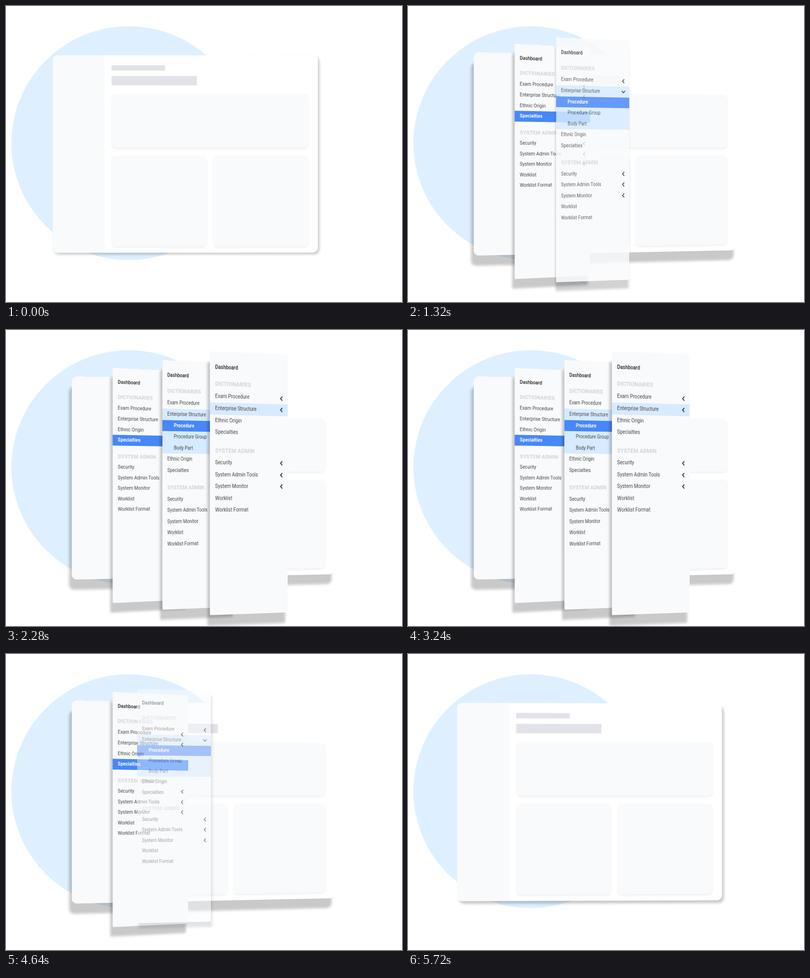
These frames come from a looping animation (800x600 px, 5.76 s). An HTML page:

```html
<!DOCTYPE html>
<html lang="en">
<head>
<meta charset="utf-8">
<title>Layered menus</title>
<style>
  html, body { margin: 0; width: 100%; height: 100%; overflow: hidden; background: #fff; }
  #stage { position: relative; width: 800px; height: 600px; overflow: hidden; font: 10.3px Roboto, sans-serif; color: #444; }
  #stage div, #stage svg { position: absolute; }
  .disc { left: 11px; top: 41px; width: 474px; height: 474px; border-radius: 50%; background: #def0ff; }
  .layer { left: 0; top: 0; transform-origin: 0 0; }
  .card { width: 536px; height: 400px; border-radius: 10px; background: #fff; }
  .side { width: 105px; height: 400px; border-radius: 10px 0 0 10px; background: #f9fafc; }
  .bar { left: 119px; background: #e2e3e9; }
  .panel { border-radius: 9px; background: #f9fafc; box-shadow: 0 3px 4px rgba(0, 0, 0, .06); }
  .menu { width: 172px; height: 500px; border-radius: 2px; background: #f9fafc; opacity: 0; }
  .row { left: 0; width: 172px; height: 22.6px; line-height: 22.6px; text-indent: 11.3px; white-space: nowrap; }
  .top { font-weight: 500; color: #222; }
  .head { font-size: 11.8px; font-weight: 700; color: #d2d4d8; }
  .open { background: #d6ebff; }
  .sub { text-indent: 26.5px; }
  .on { background: #4787f8; color: #fff; font-weight: 700; }
  .row svg { left: 153px; top: 6.3px; width: 10px; height: 10px; fill: none; stroke: #111; stroke-width: 1.7; }
  .down svg { transform: rotate(-90deg); }
</style>
</head>
<body>
<div id="stage">
  <div class="disc"></div>
  <div class="layer card">
    <div class="side"></div>
    <div class="bar" style="top:20px;width:108px;height:10.5px"></div>
    <div class="bar" style="top:42px;width:172px;height:19px"></div>
    <div class="panel" style="left:119px;top:78px;width:398px;height:109px"></div>
    <div class="panel" style="left:119px;top:203px;width:192px;height:184px"></div>
    <div class="panel" style="left:324px;top:203px;width:193px;height:184px"></div>
  </div>
</div>
<script>
const LOOP = 5760, PHASE = 40, MOVE = 500, ROW = 22.55;
const stage = document.getElementById('stage');
const arrow = '<svg viewBox="0 0 10 10"><path d="M7 1L3 5L7 9"/></svg>';

function addRow(menu, y, text, cls = '') {
  const row = document.createElement('div');
  row.className = 'row ' + cls;
  row.style.top = y - 11.3 + 'px';
  row.innerHTML = text + (/more|down/.test(cls) ? arrow : '');
  menu.append(row);
}

function addMenu(styles, subs = []) {
  const menu = document.createElement('div');
  menu.className = 'layer menu';
  const list = (y, items) => items.forEach(([text, cls = ''], i) =>
    addRow(menu, y + i * ROW, text, cls + ' ' + (styles[text] || '')));
  const shift = subs.length * ROW;
  addRow(menu, 30.4, 'Dashboard', 'top');
  addRow(menu, 61.7, 'DICTIONARIES', 'head');
  list(85.7, [['Exam Procedure', 'more'], ['Enterprise Structure', 'more'],
    ...subs.map(s => [s, 'sub open']), ['Ethnic Origin'], ['Specialties']]);
  addRow(menu, 187.8 + shift, 'SYSTEM ADMIN', 'head');
  list(211.3 + shift, [['Security', 'more'], ['System Admin Tools', 'more'],
    ['System Monitor', 'more'], ['Worklist'], ['Worklist Format']]);
  stage.append(menu);
  return menu;
}

// Poses: left x, right x, left top, left bottom, right top, right bottom
const layers = [
  { el: stage.querySelector('.card'), w: 536, h: 400, start: 10, solid: true,
    from: [92.5, 628.7, 100, 500, 100, 500], to: [133, 663, 94, 506, 104.5, 495] },
  { el: addMenu({ Specialties: 'on' }), start: 490,
    from: [133.3, 281.3, 95.5, 527, 99.5, 523], to: [215.5, 368, 77, 553.5, 84, 546.5] },
  { el: addMenu({ 'Enterprise Structure': 'open down', Procedure: 'on' },
      ['Procedure', 'Procedure Group', 'Body Part']), start: 1015,
    from: [216, 367, 80, 525, 80.5, 524.5], to: [316, 463, 61, 567, 67, 561] },
  { el: addMenu({ 'Enterprise Structure': 'open' }), start: 1500,
    from: [316, 474, 70, 554, 73, 552], to: [412, 569, 43, 578, 49.5, 572.5] }
];

// cubic-bezier(.25, .1, .25, 1)
function ease(x) {
  if (x <= 0) return 0;
  if (x >= 1) return 1;
  const curve = (a, b, s) => 3 * a * s * (1 - s) ** 2 + 3 * b * s * s * (1 - s) + s ** 3;
  let lo = 0, hi = 1;
  for (let i = 0; i < 24; i++) {
    const mid = (lo + hi) / 2;
    if (curve(.25, .25, mid) < x) lo = mid; else hi = mid;
  }
  return curve(.1, 1, lo);
}

// Perspective matrix for a box whose sides stay vertical
function project([xl, xr, tl, bl, tr, br], w, h) {
  const k = (bl - tl) / (br - tr);
  return `matrix3d(${[(xr * k - xl) / w, (tr * k - tl) / w, 0, (k - 1) / w,
    0, (bl - tl) / h, 0, 0, 0, 0, 1, 0, xl, tl, 0, 1].map(v => v.toFixed(8))})`;
}

function pose({ el, w = 172, h = 500, start, from, to, solid }, time) {
  const p = ease((time - start) / MOVE);
  const angle = (135 + 60 * p) * Math.PI / 180, dist = 4 + 17 * p;
  const dx = Math.sin(angle) * dist, dy = -Math.cos(angle) * dist;
  el.style.transform = project(from.map((v, i) => v + (to[i] - v) * p), w, h);
  el.style.boxShadow = `${dx.toFixed(2)}px ${dy.toFixed(2)}px 5px rgba(0,0,0,.21)`;
  if (!solid) el.style.opacity = p;
}

// The second half of the loop plays the first half backwards
function frame(now) {
  const t = (now - PHASE + LOOP) % LOOP;
  const time = Math.min(t, LOOP - t);
  layers.forEach(layer => pose(layer, time));
  requestAnimationFrame(frame);
}
frame(0);
</script>
</body>
</html>
```
